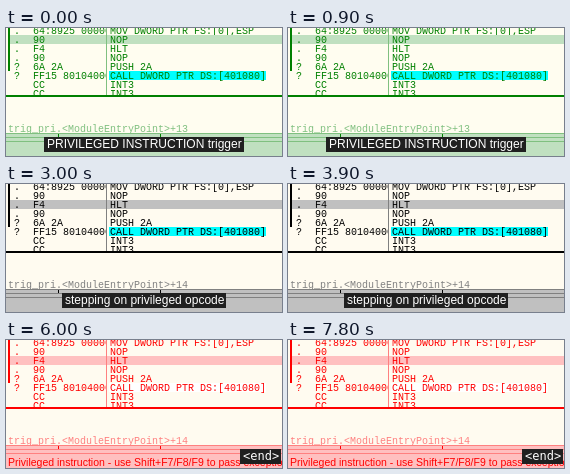
An HTML page with a canvas that plays this animation: 276x128 px, repeating every 9000 ms.

```html
<!DOCTYPE html>
<html lang="en">
<head>
<meta charset="utf-8">
<title>Privileged instruction trigger</title>
<style>
html, body { margin: 0; width: 100%; height: 100%; overflow: hidden; background: #fffbf0; }
canvas { display: block; width: 276px; height: 128px; }
</style>
</head>
<body>
<canvas id="stage" width="276" height="128"></canvas>
<script>
const ctx = document.getElementById('stage').getContext('2d');
const W = 276, H = 128, LOOP = 9000;
const PAPER = '#fffbf0', FACE = '#c0c0c0', SHADOW = '#808080';
const MONO = '10px "Liberation Mono", monospace';
const STATUS = '10.5px "Liberation Sans", sans-serif';
const CAPTION = '12px "Liberation Sans", sans-serif';
const END = '12px "DejaVu Sans Mono", monospace';

// mark, opcode bytes, disassembly
const code = [
  ['.', '64:8925 00000000', 'MOV DWORD PTR FS:[0],ESP'],
  ['.', '90', 'NOP'],
  ['.', 'F4', 'HLT'],
  ['.', '90', 'NOP'],
  ['?', '6A 2A', 'PUSH 2A'],
  ['?', 'FF15 80104000', 'CALL DWORD PTR DS:[401080]'],
  ['', 'CC', 'INT3'],
  ['', 'CC', 'INT3']
];
const CALL_ROW = 5, ROW_H = 9, FIRST_TOP = -2;
const CODE_H = 67, SPLIT = 100;

const steps = [
  { at: 0, row: 1, offset: 13, tint: 'rgb(0,128,0)',
    label: { text: 'PRIVILEGED INSTRUCTION trigger', mid: 138, font: CAPTION } },
  { at: 1500, row: 1, offset: 13 },
  { at: 3000, row: 2, offset: 14,
    label: { text: 'stepping on privileged opcode', mid: 138, font: CAPTION } },
  { at: 4500, row: 2, offset: 14, fault: true,
    label: { text: 'exception triggered', mid: 138, font: CAPTION } },
  { at: 6000, row: 2, offset: 14, fault: true, tint: 'rgb(255,0,0)',
    label: { text: '<end>', mid: 255, font: END } }
];

function box(x, y, w, h, color) {
  ctx.fillStyle = color;
  ctx.fillRect(x, y, w, h);
}

function write(text, x, y, font, color = '#000') {
  ctx.font = font;
  ctx.fillStyle = color;
  ctx.fillText(text, x, y);
}

function clipped(x, y, w, h, paint) {
  ctx.save();
  ctx.beginPath();
  ctx.rect(x, y, w, h);
  ctx.clip();
  paint();
  ctx.restore();
}

function drawCode(current) {
  code.forEach(([mark, bytes, text], i) => {
    const top = FIRST_TOP + i * ROW_H, base = top + 8;
    if (i === current) box(4, top, W - 4, ROW_H, FACE);
    if (i === CALL_ROW) box(103, top, text.length * 6 + 1, ROW_H, '#0ff');
    write(mark, 8, base, MONO);
    clipped(20, 0, SPLIT - 20, CODE_H, () => write(bytes, 27, base, MONO));
    write(text, 104, base, MONO);
  });
  box(2, 0, 2, FIRST_TOP + CALL_ROW * ROW_H, '#000');
  box(SPLIT, 0, 1, CODE_H, SHADOW);
}

function drawStatus(fault) {
  box(0, 105, W, 23, FACE);
  for (const y of [105, 109, 113]) box(0, y, W, 1, SHADOW);
  for (const x of [52, 154]) box(x, 106, 1, 3, '#000');
  if (fault) {
    write('Privileged instruction - use Shift+F7/F8/F9 to pass exception to program',
      2, 126, STATUS);
  }
}

function drawLabel({ text, mid, font }) {
  ctx.font = font;
  const w = Math.round(ctx.measureText(text).width);
  const x = Math.round(mid - w / 2);
  box(x - 3, 109, w + 5, 15, '#202020');
  write(text, x, 120, font, '#fff');
}

function draw(step) {
  box(0, 0, W, H, PAPER);
  clipped(0, 0, W, CODE_H, () => drawCode(step.row));
  box(0, CODE_H, W, 2, '#000');
  write('trig_pri.<ModuleEntryPoint>+' + step.offset, 2, 104, MONO, SHADOW);
  drawStatus(step.fault);
  if (step.tint) {
    ctx.globalCompositeOperation = 'screen';
    box(0, 0, W, H, step.tint);
    ctx.globalCompositeOperation = 'source-over';
  }
  if (step.label) drawLabel(step.label);
}

const start = performance.now();

function tick() {
  const t = (performance.now() - start) % LOOP;
  draw(steps.filter(s => s.at <= t).pop());
  requestAnimationFrame(tick);
}
tick();
</script>
</body>
</html>
```
